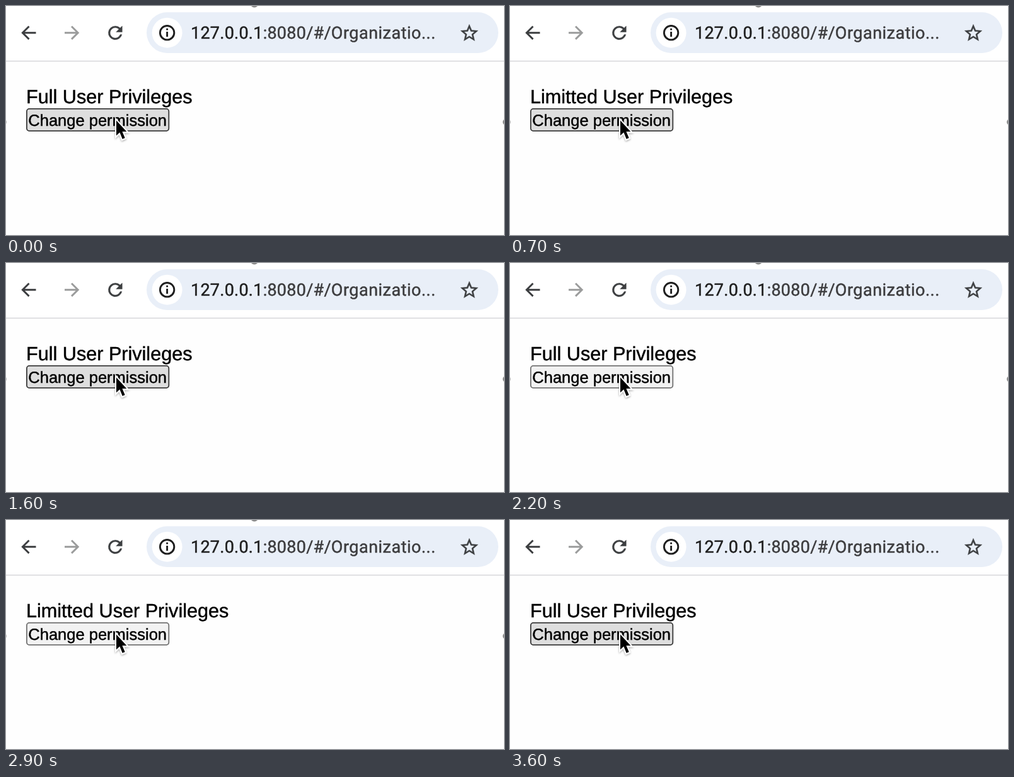
An HTML page that plays this animation: 790 px wide and 365 px high, repeating every 3700 ms.

```html
<!DOCTYPE html>
<html lang="en">
<head>
<meta charset="utf-8">
<title>Permission toggle</title>
<style>
  html, body { margin: 0; width: 100%; height: 100%; overflow: hidden; background: #fefefe; }
  svg { display: block; width: 790px; height: 365px; }
  text { text-rendering: geometricPrecision; white-space: pre; stroke-width: .45; }

  .address { font: 27px Roboto, sans-serif; fill: #3c3c3e; stroke: #3c3c3e; letter-spacing: .25px; }
  .host { fill: #1f1f1f; stroke: #1f1f1f; }
  .route { letter-spacing: .5px; }
  .label, .caption { font: 30.6px "Liberation Sans", Arial, sans-serif; stroke: #000; }
  .caption { font-size: 25.5px; text-anchor: middle; }

  .icon { fill: none; stroke: #3c3e40; stroke-width: 2.9; }
  .solid { fill: #3c3e40; stroke: #3c3e40; stroke-width: .3; }
  .disabled { stroke: #9b9c9c; }
  .button { fill: #dedede; stroke: #3a3a3a; stroke-width: 1.8; }

  .full, .limited, .button, .handles { animation: 3700ms step-end infinite; }
  .full { animation-name: full; }
  .limited { animation-name: limited; }
  .button { animation-name: press; }
  .handles { animation-name: handles; }

  @keyframes full {
    0%, 43.24%, 83.78%, 100% { visibility: visible; }
    18.91%, 62.16% { visibility: hidden; }
  }
  @keyframes limited {
    0%, 43.24%, 83.78%, 100% { visibility: hidden; }
    18.91%, 62.16% { visibility: visible; }
  }
  @keyframes press {
    0%, 16.21%, 43.24%, 62.16%, 81.08%, 100% { fill: #dedede; stroke: #3a3a3a; }
    13.51%, 40.54%, 59.45%, 78.37% { fill: #f2f2f2; stroke: #727272; }
  }
  @keyframes handles {
    0% { visibility: visible; }
    97.29%, 100% { visibility: hidden; }
  }
</style>
</head>
<body>
<svg viewBox="0 0 790 365">
  <defs>
    <filter id="shadow" x="-50%" y="-50%" width="200%" height="200%">
      <feDropShadow dx="0" dy="1.5" stdDeviation="1.6" flood-color="#000" flood-opacity=".35"/>
    </filter>
  </defs>

  <!-- Toolbar -->
  <rect width="790" height="87" fill="#fff"/>
  <rect y="87" width="790" height="1.6" fill="#d9dadd"/>
  <path class="icon" d="M47.5 42.7H27M36.5 32.5 26.3 42.7 36.5 52.9"/>
  <path class="icon disabled" d="M93 42.7H113.5M104 32.5 114.2 42.7 104 52.9"/>
  <path class="solid" transform="translate(156.9 26.4) scale(1.37)"
    d="M17.65 6.35A7.96 7.96 0 0 0 12 4A8 8 0 1 0 19.73 14H17.65A6 6 0 1 1 12 6C13.66 6 15.14 6.69 16.22 7.78L13 11H20V4Z"/>

  <rect x="223" y="10" width="558" height="65" rx="32.5" fill="#e9eff8"/>
  <circle cx="255.6" cy="42.7" r="24" fill="#fff"/>
  <g class="icon" style="stroke:#1f1f1f">
    <circle cx="255.6" cy="42.7" r="11.2"/>
    <path d="M255.6 35.7V38.5M255.6 41.1V49.1"/>
  </g>
  <text class="address" x="293" y="52"><tspan class="host">127.0.0.1</tspan>:8080/#/<tspan class="route">Organizatio...</tspan></text>
  <path class="solid" fill-rule="evenodd" transform="translate(718.4 26.5) scale(1.38)"
    d="M22 9.24 14.81 8.62 12 2 9.19 8.63 2 9.24 7.46 13.97 5.82 21 12 17.27 18.18 21 16.55 13.97ZM12 15.4 8.24 17.67 9.24 13.39 5.92 10.51 10.3 10.13 12 6.1 13.71 10.14 18.09 10.52 14.77 13.4 15.77 17.68Z"/>

  <!-- Page -->
  <text class="label full" x="32" y="155.3">Full User Privileges</text>
  <text class="label limited" x="32" y="155.3">Limitted User Privileges</text>
  <rect class="button" x="32.9" y="163.9" width="225.4" height="35.2" rx="4"/>
  <text class="caption" x="145.2" y="190.8">Change permission</text>

  <!-- Selection handles at the edges -->
  <g class="handles" fill="#8c8c8c">
    <circle cx="394" cy="-3.5" r="6"/>
    <circle cx="-4" cy="185" r="5" fill="#b5b5b5"/>
    <circle cx="793" cy="185" r="5"/>
  </g>

  <!-- Pointer -->
  <path filter="url(#shadow)" fill="#000" stroke="#fff" stroke-width="4" paint-order="stroke"
    d="M175 182.5V206.6L180.4 201.6 184.7 212 188.7 210.3 184.4 200.2H191.4Z"/>
</svg>
</body>
</html>
```
